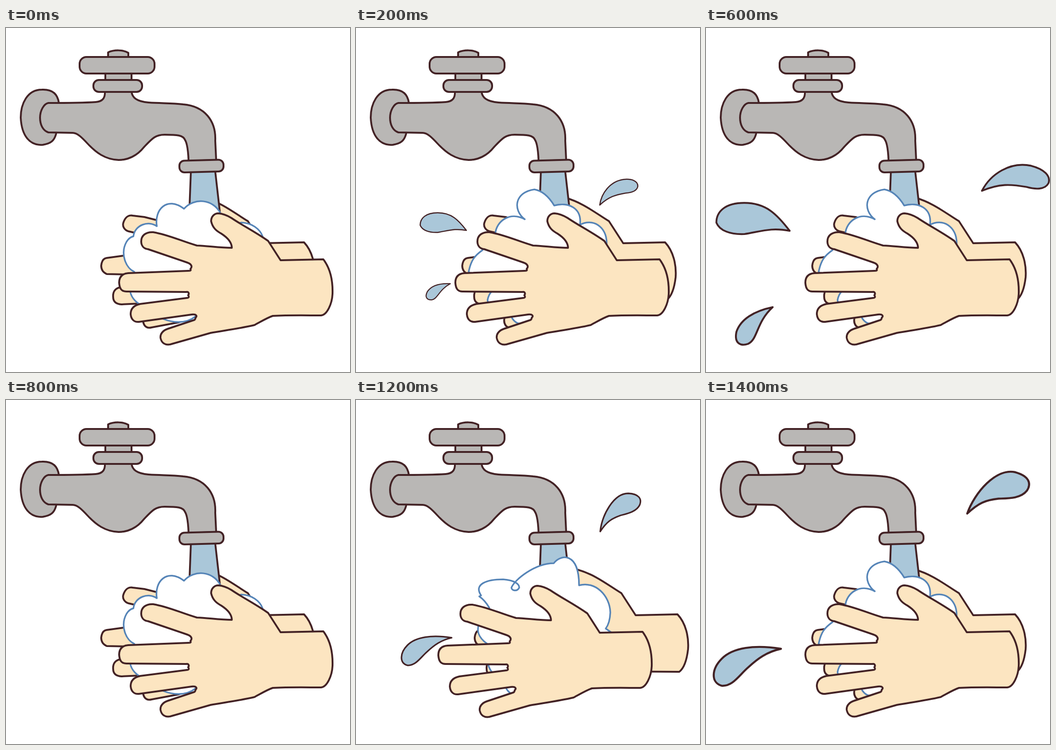
An HTML page that plays this animation: 748 by 748 pixels, repeating every 1.6 s.

```html
<!DOCTYPE html>
<html lang="en">
<head>
<meta charset="utf-8">
<title>Washing hands</title>
<style>
  html, body { margin: 0; width: 100%; height: 100%; overflow: hidden; background: #fff; }
  svg { display: block; width: 100%; height: 100%; }
  .line { stroke: #432225; stroke-width: 4; stroke-linejoin: round; stroke-linecap: round; }
  .metal { fill: #b9b7b5; }
  .skin { fill: #fce5c1; }
  .water { fill: #aac7d9; }
  #foam { fill: #fff; stroke: #5584b7; stroke-width: 3.5; stroke-linejoin: round; }
</style>
</head>
<body>
<svg viewBox="0 0 748 748">
  <g class="line metal">
    <path d="M115,163C112,141 98,133 78,134C46,134 32,165 32,195C34,235 52,256 80,254C98,251 105,245 109,230"/>
    <path d="M222,63V53C235,47 255,47 266,54V63Z"/>
    <path d="M216,98H273V114H216Z"/>
    <path d="M92,163C150,163 180,162 195,161C210,160 216,152 215,138H273C274,152 285,160 310,162C340,164 360,163 385,166C432,170 457,202 455,245L457,287L397,289C396,265 394,250 389,243C385,233 372,232 345,232C325,232 318,240 300,259C285,278 265,287 245,287C215,286 195,270 178,252C165,238 155,228 145,228L92,227C80,223 74,210 74,195C74,180 82,165 92,163Z"/>
    <rect x="160" y="63" width="163" height="36" rx="15"/>
    <rect x="190" y="113" width="106" height="26" rx="12"/>
  </g>
  <path id="back" class="line skin" d="M455,369C492,379 522,403 550,420L581,468L672,466C690,485 697,515 695,542C692,568 685,584 676,591L520,590L400,640L341,651C326,655 320,642 323,630L340,598L275,601C262,600 257,594 257,585C256,573 262,566 272,564L310,550L300,536L243,535C234,531 231,525 231,517C232,506 236,501 243,500L280,495L340,450L303,445L290,442C281,439 277,431 279,424C283,411 291,406 300,408L325,411L400,430Z"/>
  <path class="water" d="M402,312L399,390L466,402L455,312Z"/>
  <path class="line" fill="none" d="M402,312L399,390M455,312L465,400"/>
  <rect class="line metal" x="377" y="287.500" width="96" height="25.500" rx="11" transform="rotate(-1.500 425 300)"/>
  <path id="foam"/>
  <path id="front" class="line skin" d="M432,403C422,403 416,411 416,420C419,434 427,441 438,447C452,456 461,467 461,478C435,478 410,474 385,473C350,463 325,450 290,444C273,443 264,452 264,464C264,474 270,480 279,481L364,510C373,513 376,519 371,524C373,528 370,528 366,528L236,533C223,534 216,541 216,554C217,568 222,573 232,573L362,574C367,573 369,578 366,581C369,585 367,587 363,587L262,600C248,603 241,611 241,622C242,634 249,640 259,639L374,623C383,622 387,626 382,630C382,634 380,635 376,636L322,654C310,658 305,666 306,674C308,685 316,690 327,688L415,663C450,657 480,653 510,646C525,638 538,630 550,626C590,624 625,625 655,625C668,624 679,600 680,578C681,545 673,520 660,503L567,505L540,463C510,442 485,430 460,413Q445,404 432,403Z"/>
  <g id="drops" class="line water"></g>
</svg>
<script>
const el = id => document.getElementById(id);

// front and back are the horizontal shifts of the hands
const apart = {
  front: 30, back: -24,
  foam: "M279,530C260,522 248,490 262,465Q268,455 277,453C280,428 310,418 328,431C322,395 350,365 387,393C410,368 450,372 466,402L480,430L512,423C535,424 552,437 558,453L560,520L420,615L412,627C390,645 360,640 340,632L300,605C285,600 273,588 270,573Q285,555 279,530Z"
};
const middle = {
  front: 0, back: 0,
  foam: "M245,530C250,505 258,495 275,483L303,447C305,420 335,398 367,416C340,395 345,357 388,351Q412,355 431,386C460,378 492,390 487,428C515,413 545,432 545,467V540L400,600L395,650L352,642Q342,638 337,626L310,610Q288,605 286,592Q288,580 295,573L270,555Z"
};
const crossed = {
  front: -37, back: 27,
  foam: "M285,530C264,515 262,500 268,485L290,452Q280,435 268,427L272,425C255,400 285,390 320,390C345,392 355,400 355,408C350,418 338,414 338,408C345,390 390,355 430,355C445,335 485,330 485,403C520,393 552,425 553,462Q552,485 543,497L556,506L500,560L340,640Q330,635 325,624L305,600Q290,590 287,573L300,550Z"
};
const poses = [apart, middle, crossed, middle];

// Drop outlines start at their tip; each stage is [tip x, tip y, scale, angle]
const splashes = [
  [
    { d: "M0,0c-23,-30 -43,-51 -83,-51c-35,0 -51,16 -51,36c6,15 26,22 51,21c35,-6 50,-12 83,-6z",
      stages: [[240, 440, .75, 0], [213, 440, 1, 0], [182, 441, 1.19, 0]] },
    { d: "M0,0c9,-33 39,-64 79,-64c25,1 40,11 38,25c-4,14 -23,16 -38,15c-30,1 -50,4 -79,24z",
      stages: [[530, 385, .75, -8], [561, 373, 1, 0], [600, 354, 1.18, 12]] },
    { d: "M0,0c-33,1 -58,11 -69,31c-8,20 4,26 16,24c18,-4 20,-34 53,-55z",
      stages: [[205, 556, .7, 5], [183, 574, 1, 0], [145, 607, 1.26, -10]] }
  ],
  [
    { d: "M0,0c-43,-7 -78,-2 -96,16c-17,17 -18,39 0,44c18,1 28,-17 43,-30c15,-14 30,-25 53,-30z",
      stages: [[232, 509, .73, 7], [208, 517, 1, 0], [163, 541, 1.34, 0]] },
    { d: "M0,0c4,-36 29,-83 61,-83c23,1 30,12 25,25c-7,15 -27,19 -42,23c-20,7 -30,14 -44,35z",
      stages: [[512, 318, .72, -12], [531, 286, 1, 0], [568, 247, 1.34, 13]] }
  ]
];

function dropSvg({ d, stages }, stage) {
  const [x, y, scale, angle] = stages[stage];
  return `<path d="${d}" style="stroke-width:3.3" transform="translate(${x} ${y}) rotate(${angle}) scale(${scale})"/>`;
}

function show(step) {
  const phase = step % 4, pose = poses[phase];
  el("front").setAttribute("transform", `translate(${pose.front} ${pose === crossed ? 1 : 0})`);
  el("back").setAttribute("transform", `translate(${pose.back} 0)`);
  el("foam").setAttribute("d", pose.foam);
  const splash = splashes[step >> 2];
  el("drops").innerHTML = phase ? splash.map(drop => dropSvg(drop, phase - 1)).join("") : "";
}

let shown = -1;
function tick() {
  const step = Math.floor(performance.now() % 1600 / 200);
  if (step !== shown) show(shown = step);
  requestAnimationFrame(tick);
}
tick();
</script>
</body>
</html>
```
